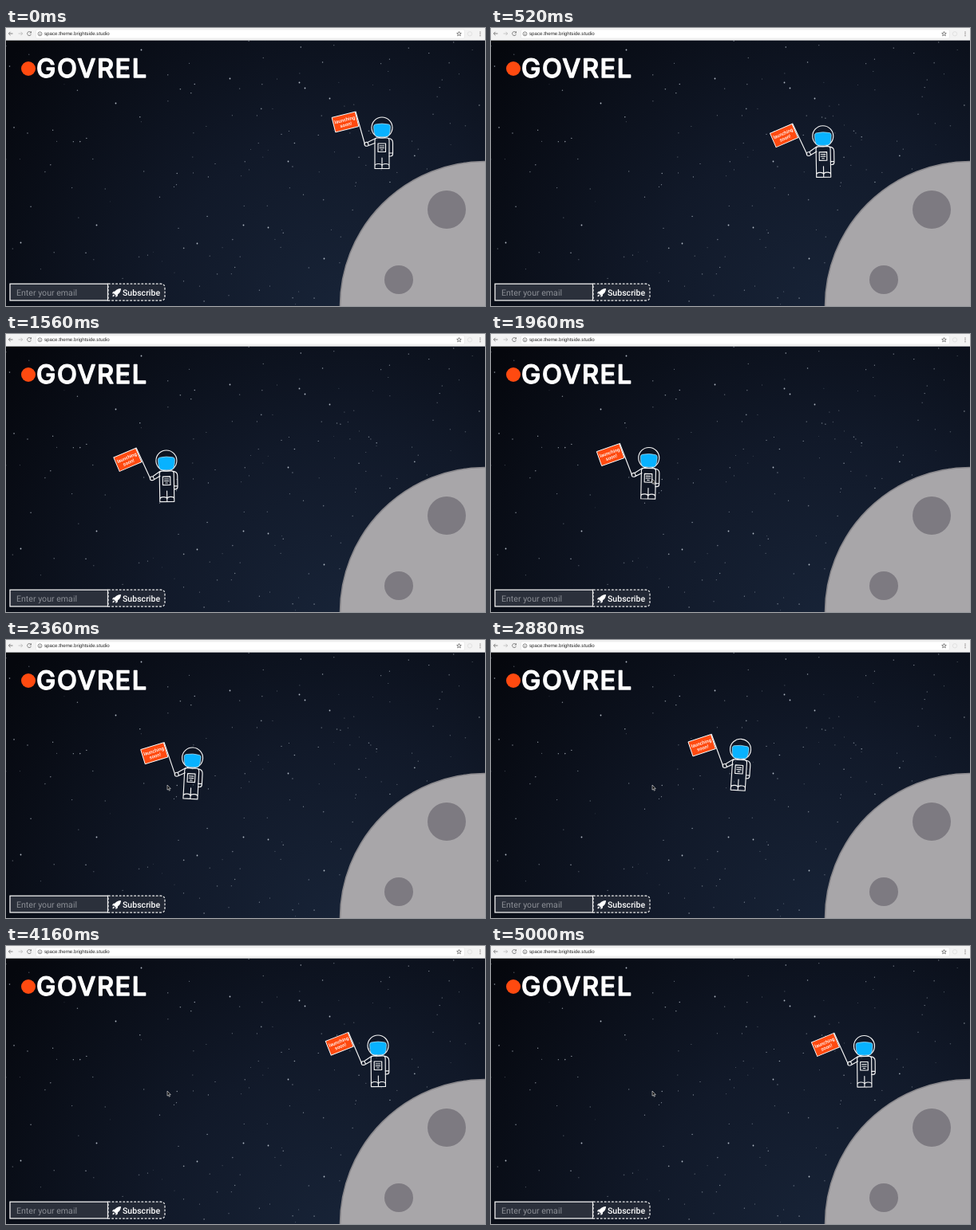
Recreate the animation shown at these times as an HTML page. Size 600 px wide and 349 px high, loop 5.04 s.

```html
<!DOCTYPE html>
<html lang="en">
<head>
<meta charset="utf-8">
<title>Launching soon</title>
<style>
  html, body { margin: 0; width: 100%; height: 100%; overflow: hidden; background: #05070d; }
  svg { display: block; width: 100vw; height: 100vh; }
  text { font-family: Roboto, "Liberation Sans", sans-serif; text-rendering: geometricPrecision; }
  .logo { font: 500 32.5px Inter, sans-serif; letter-spacing: 1.6px; fill: #fff; stroke: #fff; stroke-width: 1.3; stroke-linejoin: round; }
  .line { fill: none; stroke: #f4f4f4; stroke-width: 1.15; stroke-linejoin: round; stroke-linecap: round; }
  .icon { fill: none; stroke: #666; stroke-width: .8; }
</style>
</head>
<body>
<svg viewBox="0 0 600 349">
  <defs>
    <radialGradient id="sky" gradientUnits="userSpaceOnUse" cx="430" cy="370" r="540">
      <stop offset="0" stop-color="#182438"/>
      <stop offset=".45" stop-color="#111929"/>
      <stop offset="1" stop-color="#05070d"/>
    </radialGradient>
  </defs>
  <rect width="600" height="349" fill="url(#sky)"/>
  <g id="stars" fill="#c3ccd6"></g>

  <g id="moon">
    <circle cx="600" cy="349" r="181.5" fill="#a8a6a9" stroke="#8a888c" stroke-width="1.6"/>
    <circle cx="552" cy="228" r="24" fill="#7d7a81"/>
    <circle cx="492" cy="316" r="18" fill="#7d7a81"/>
  </g>

  <g id="browser">
    <rect width="600" height="15.600" fill="#f3f3f3"/>
    <rect x="37.500" y="2" width="537" height="11" rx="1.500" fill="#fff" stroke="#e2e2e2" stroke-width=".6"/>
    <path class="icon" d="M8.500 7H3.500M5.500 4.800L3.300 7l2.200 2.200M31.200 5.600a2.500 2.500 0 1 0 .3 2.200M31.500 4.300v1.800h-1.800"/>
    <path class="icon" opacity=".4" d="M15.500 7h5M18.500 4.800L20.700 7l-2.200 2.200"/>
    <circle class="icon" cx="42.500" cy="7.300" r="2.400"/>
    <path class="icon" d="M42.500 6.700v2"/>
    <text x="48" y="9.400" font-size="6.170" style="font-family: 'Liberation Sans', sans-serif" fill="#222">space.theme.brightside.studio</text>
    <path class="icon" d="M567.500 4.500l.8 1.900 2 .1-1.600 1.300.6 2-1.800-1.100-1.800 1.100.6-2-1.600-1.300 2-.1z"/>
    <circle cx="581" cy="7.300" r="2.700" fill="none" stroke="#e2e2e2"/>
    <path d="M594 4.500v1.300M594 6.700V8M594 8.900v1.300" stroke="#8c8787" stroke-width="1.300"/>
  </g>

  <circle cx="28" cy="51" r="9" fill="#ff4a10"/>
  <text class="logo" x="38" y="61.500">GOVREL</text>

  <g id="form">
    <rect x="5" y="321.200" width="122.500" height="20.800" fill="#2b303b" stroke="#eee" stroke-width="1.300"/>
    <text x="13" y="335.500" font-size="10.600" fill="#8b8e95">Enter your email</text>
    <path d="M128 321.200h66q5 0 5 5v11q0 5-5 5h-66z" fill="#222835" stroke="#eee" stroke-width="1.200" stroke-dasharray="2.800 1.800"/>
    <path fill="#fff" d="M144 327q-5 0-7.500 3.600l-2.300.3-1.300 2.300 2.400.2 2 2 .2 2.500 2.300-1.400.3-2.300Q144 332 144 327zM135 334.500q-1.600.8-1.600 2.700 1.900 0 2.700-1.500z"/>
    <text x="146" y="335.500" font-size="10.550" font-weight="500" fill="#fff">Subscribe</text>
  </g>

  <!-- Astronaut, with its origin at the centre of the helmet -->
  <g id="astronaut">
    <circle class="line" r="13"/>
    <path d="M-8.500-4Q0-6 8.500-4Q10.500-3.500 10.500-1Q10.500 5 9 9Q8.300 11 6 11.300Q0 12-6 11.300Q-8.300 11-9 9Q-10.500 5-10.500-1Q-10.500-3.500-8.500-4z" fill="#08b2ff" stroke="#d8f0ff" stroke-width=".6"/>
    <path class="line" d="M-6 13H6Q9 13 9 16V51.500H-9V16Q-9 13-6 13zM0 38V51M-9 51.500v-3q0-3 4.500-3t4.500 3v3M0 48.500q0-3 4.500-3t4.500 3"/>
    <path class="line" d="M8 13.500Q13.500 14 13.500 19V33q0 3-3 3H9M9 32h4.500"/>
    <path class="line" d="M-5 20H4.500V30.500H-5zM-3 23H2.500M-3 25.500H2.500M-1.500 28H1"/>
    <g id="arm">
      <path class="line" d="M-8 13.500L-18 18.500q-4-.5-4 2.300t3.500 2.400L-9 19.500M-18 18.500l1.300 4"/>
      <path class="line" d="M-33-20L-21.500 21"/>
      <g transform="translate(-46 -7) rotate(-14)">
        <rect x="-15" y="-9.500" width="30" height="19" fill="#ff4a10" stroke="#fff" stroke-width=".9"/>
        <g font-size="6" font-weight="500" fill="#fff" text-anchor="middle">
          <text y="-.8">launching</text>
          <text y="5.500">soon!</text>
        </g>
      </g>
    </g>
  </g>

  <path id="cursor" d="M202 182v6.200l1.400-1.200 1 2.200 1-.5-1-2.100h1.900z" fill="#111" stroke="#eee" stroke-width=".6"/>
</svg>
<script>
const LOOP = 5040, CURSOR_SHOWN = 1900;
const byId = id => document.getElementById(id);

// time, x, y, body angle, arm angle
const poses = [
  [0, 471, 125, 0, 0],
  [1000, 324, 150, -2, -16],
  [1560, 201, 159, -1, -8],
  [1760, 191, 158, 0, -7],
  [2360, 233.5, 148, 3, -6],
  [3400, 396, 129, 4, -10],
  [4160, 466, 125, -.5, -7],
  [4400, 467.5, 125.5, -.5, -8]
];

const slope = (i, k) => (poses[i + 1][k] - poses[i][k]) / (poses[i + 1][0] - poses[i][0]);

// Harmonic mean of neighbouring slopes: smooth, without overshoot
function tangent(i, k) {
  if (i === 0 || i === poses.length - 1) return 0;
  const a = slope(i - 1, k), b = slope(i, k);
  return a * b > 0 ? 2 * a * b / (a + b) : 0;
}

function poseAt(time) {
  const last = poses.length - 1;
  if (time >= poses[last][0]) return poses[last].slice(1);
  const i = poses.findIndex(p => p[0] > time) - 1;
  const from = poses[i], to = poses[i + 1];
  const span = to[0] - from[0], u = (time - from[0]) / span, v = 1 - u;
  return [1, 2, 3, 4].map(k =>
    from[k] * v * v * (1 + 2 * u) + to[k] * u * u * (3 - 2 * u) +
    span * u * v * (tangent(i, k) * v - tangent(i + 1, k) * u));
}

function drawStars() {
  let seed = 11;
  const random = () => (seed = seed * 16807 % 2147483647) / 2147483647;
  const star = (x, y, r, alpha) => `<circle cx="${x}" cy="${y}" r="${r}" opacity="${alpha}"/>`;
  const bright = [[169, 27], [367, 68], [113, 247], [297, 247], [239, 270], [374, 75], [137, 94],
    [280, 63], [353, 167], [18, 269], [398, 289], [328, 250], [405, 88]];
  let markup = bright.map(([x, y]) => star(x + .5, y + .5, .9, .9)).join("");
  for (let i = 0; i < 200; i++) {
    markup += star(random() * 600, 16 + random() * 333, .45 + random() * .4, .3 + random() * .5);
  }
  byId("stars").innerHTML = markup;
}

function render(now) {
  const time = now % LOOP;
  const [x, y, body, arm] = poseAt(time);
  byId("astronaut").setAttribute("transform", `translate(${x} ${y}) rotate(${body})`);
  byId("arm").setAttribute("transform", `rotate(${arm} -11 14)`);
  byId("cursor").style.display = time < CURSOR_SHOWN ? "none" : "";
}

drawStars();
const start = performance.now();
function tick() {
  render(performance.now() - start);
  requestAnimationFrame(tick);
}
tick();
</script>
</body>
</html>
```
